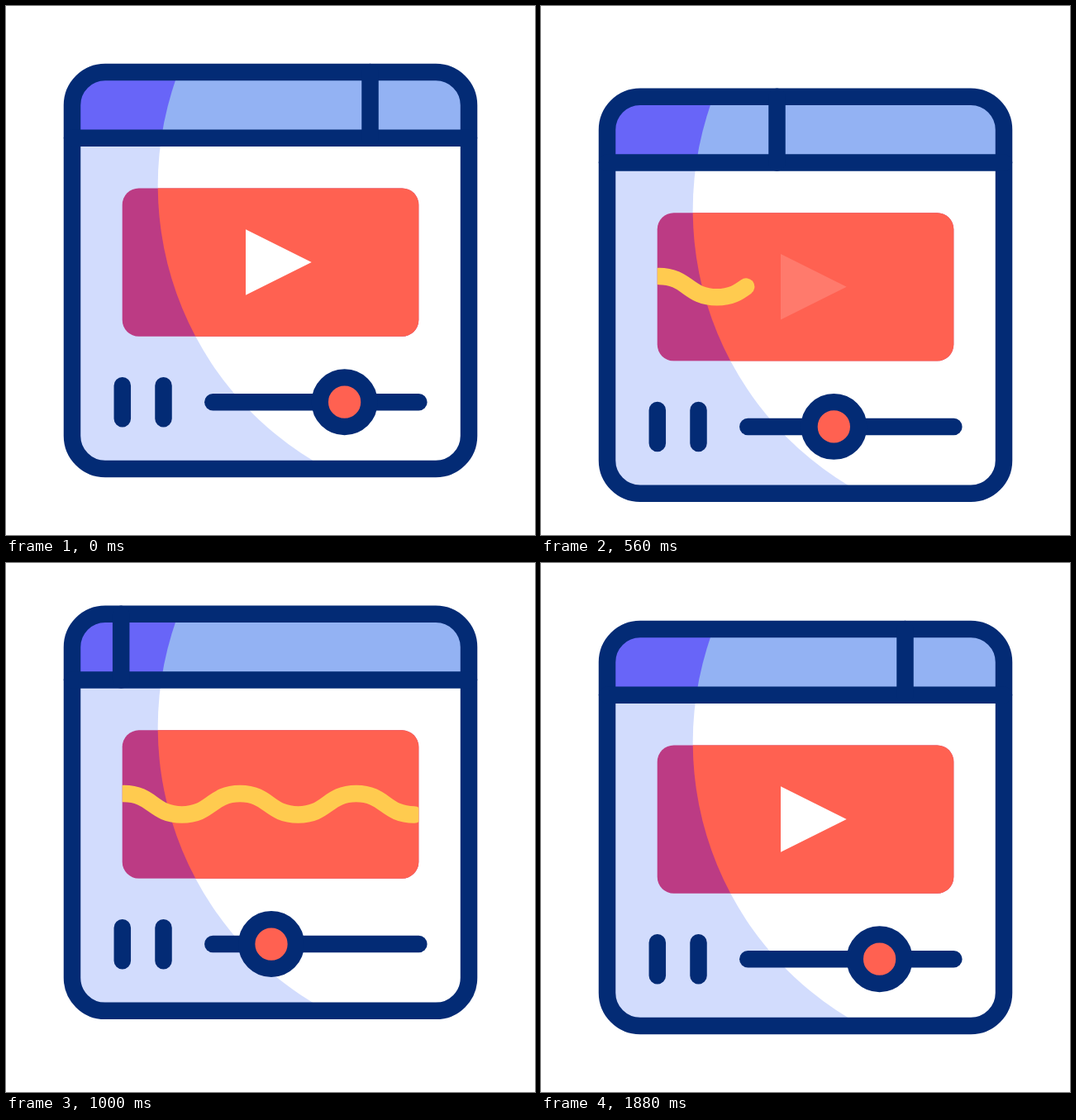
Animation of 640 by 640 pixels, one loop 2 s. Source, as an HTML page:

```html
<!DOCTYPE html>
<html lang="en">
<head>
<meta charset="utf-8">
<title>Video player</title>
<style>
  html, body { margin: 0; width: 100%; height: 100%; overflow: hidden; background: #fff; }
  svg { display: block; width: 100%; height: 100%; }
  .line { fill: none; stroke: #032b75; stroke-width: 20.5; stroke-linecap: round; }
</style>
</head>
<body>
<svg viewBox="0 0 640 640">
  <defs>
    <clipPath id="frameClip"><rect x="80" y="80" width="480" height="480" rx="40"/></clipPath>
    <clipPath id="screenClip"><rect x="140.7" y="220.5" width="358.6" height="179.3" rx="20"/></clipPath>
  </defs>
  <g id="player">
    <g clip-path="url(#frameClip)">
      <rect x="80" y="80" width="480" height="480" fill="#d2dcfd"/>
      <rect x="80" y="80" width="480" height="80" fill="#6865f8"/>
      <g clip-path="url(#discClip)">
        <rect x="80" y="160" width="480" height="400" fill="#fff"/>
        <rect x="80" y="80" width="480" height="80" fill="#93b2f3"/>
      </g>
    </g>
    <clipPath id="discClip"><circle cx="573.2" cy="217" r="389.5"/></clipPath>
    <g clip-path="url(#screenClip)">
      <rect x="140" y="220" width="360" height="180" fill="#bc3b84"/>
      <circle cx="573.2" cy="217" r="389.5" fill="#ff6151"/>
      <path id="wave" pathLength="1" fill="none" stroke="#ffcb4f" stroke-width="20.5" stroke-linecap="round"
        d="M142.5 297.2c35 0 35 25.4 70.3 25.4s35.3-25.4 70.3-25.4 35 25.4 70.3 25.4 35.3-25.4 70.3-25.4 35 25.4 70.3 25.4"/>
    </g>
    <path id="play" d="M290 270.2L369.7 310 290 349.8z" fill="#fff"/>
    <rect class="line" x="80" y="80" width="480" height="480" rx="40"/>
    <path class="line" d="M80 159.7H560"/>
    <path class="line" id="divider" d="M0 80V159.7"/>
    <path class="line" id="pause"/>
    <path class="line" d="M250.3 479.2H499.3"/>
    <circle id="knob" cy="479.2" r="29.8" fill="#ff6151" stroke="#032b75" stroke-width="20.3"/>
  </g>
</svg>
<script>
  const LOOP = 2000, STEP = 40;
  const $ = id => document.getElementById(id);
  const [player, wave, play, divider, pause, knob] =
    ['player', 'wave', 'play', 'divider', 'pause', 'knob'].map($);

  // Eased value through [time, value] keys.
  function track(t, keys) {
    if (t <= keys[0][0]) return keys[0][1];
    for (let i = 1; i < keys.length; i++) {
      const [t0, a] = keys[i - 1], [t1, b] = keys[i];
      if (t < t1) {
        const p = (t - t0) / (t1 - t0);
        return a + (b - a) * p * p * (3 - 2 * p);
      }
    }
    return keys[keys.length - 1][1];
  }

  function render(t) {
    const lift = track(t, [[160, 0], [520, 32.3], [840, -28], [1240, 0]]);
    player.setAttribute('transform', `translate(0 ${lift})`);

    const dividerX = track(t, [[200, 440.5], [920, 130.5], [1720, 440.5]]);
    divider.setAttribute('transform', `translate(${dividerX} 0)`);

    knob.setAttribute('cx', track(t, [[280, 409.6], [760, 321], [1240, 321], [1600, 409.6]]));

    const squeeze = track(t, [[1240, 0], [1420, 1], [1600, 0]]);
    const top = 459.3 + 13 * squeeze, bottom = 499.3 - 6 * squeeze;
    pause.setAttribute('d', `M140.8 ${top}V${bottom}M190.5 ${top}V${bottom}`);

    const scale = track(t, [[80, 1], [240, 0.8], [420, 1]]);
    play.setAttribute('transform', `translate(320 310) scale(${scale}) translate(-320 -310)`);
    play.setAttribute('opacity', track(t, [[320, 1], [640, 0], [1540, 0], [1860, 1]]));

    const start = track(t, [[1280, 0], [1855, 1]]);
    const end = track(t, [[400, 0], [840, 1]]);
    const shown = end - start;
    wave.style.display = shown > 0 ? '' : 'none';
    wave.setAttribute('stroke-dasharray', `${shown} 2`);
    wave.setAttribute('stroke-dashoffset', -start);
  }

  const origin = performance.now();
  function tick() {
    const t = (performance.now() - origin) % LOOP;
    render(Math.floor(t / STEP) * STEP);
    requestAnimationFrame(tick);
  }
  tick();
</script>
</body>
</html>
```
